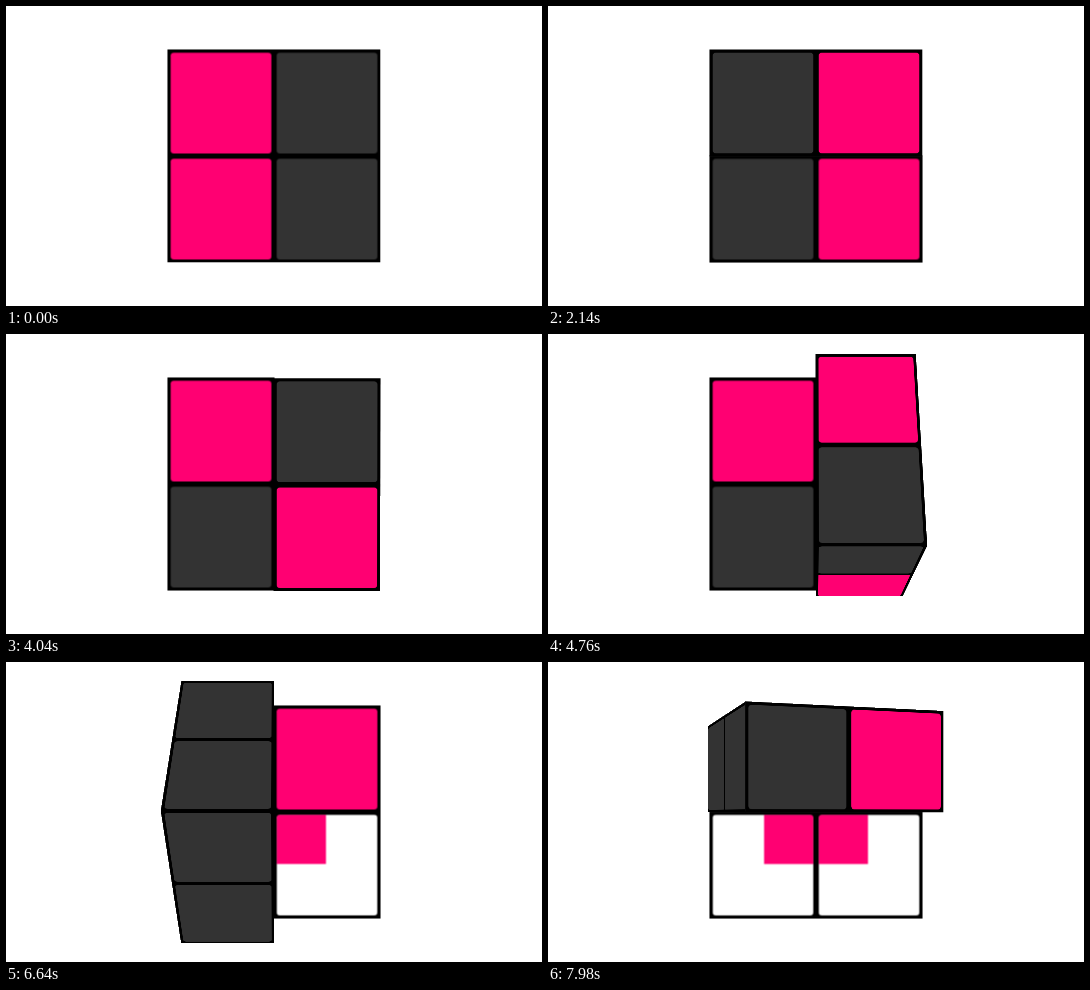
An HTML page for the animation above (8000 ms loop, 536 px wide and 300 px high).

```html
<!DOCTYPE html>
<html lang="en">
<head>
<meta charset="utf-8">
<title>Turning cube</title>
<style>
  html, body { margin: 0; width: 100%; height: 100%; overflow: hidden; background: #fff; }

  #stage {
    position: absolute; left: 0; top: 0; width: 536px; height: 300px; overflow: hidden;
    perspective: 726px; perspective-origin: 268px 150px;
  }
  .scene, .turn { position: absolute; width: 0; height: 0; transform-style: preserve-3d; }
  .scene { left: 268px; top: 150px; transform: scale3d(.4625, .4625, .4625); }

  .face {
    position: absolute; display: flex; flex-wrap: wrap;
    background: #000; box-shadow: 0 0 0 1px #000; backface-visibility: hidden;
  }
  .cell { position: relative; width: 200px; height: 200px; }
  .cell::before { content: ""; position: absolute; inset: 5px; border-radius: 6px; background: var(--fill); }
  .p { --fill: #ff0072; }
  .d { --fill: #333; }
  .x { --mark: left top; }
  .y { --mark: right top; }
  .z { --mark: right bottom; }
  .x, .y, .z { --fill: linear-gradient(#ff0072, #ff0072) var(--mark) / 93px 93px no-repeat #fff; }

  .scene { animation: 8s step-end infinite; }
  .turn { animation: 8s cubic-bezier(.65, 0, .35, 1) infinite; }

  .s1 { animation-name: show1; }
  .s2 { animation-name: show2; }
  .s3 { animation-name: show3; }
  .s4 { animation-name: show4; }
  .s5 { animation-name: show5; }
  .s1 .turn { animation-name: front; }
  .s2 .turn { animation-name: top; }
  .s3 .turn { animation-name: right; }
  .s4 .turn { animation-name: left; }
  .s5 .turn { animation-name: again; animation-timing-function: cubic-bezier(.426, 0, .748, .375); }

  @keyframes show1 { 0% { visibility: visible } 26.75%, 100% { visibility: hidden } }
  @keyframes show2 { 0% { visibility: hidden } 26.75% { visibility: visible } 49.25%, 100% { visibility: hidden } }
  @keyframes show3 { 0% { visibility: hidden } 49.25% { visibility: visible } 71.75%, 100% { visibility: hidden } }
  @keyframes show4 { 0% { visibility: hidden } 71.75% { visibility: visible } 94.25%, 100% { visibility: hidden } }
  @keyframes show5 { 0% { visibility: hidden } 94.25%, 100% { visibility: visible } }

  @keyframes front { 0%, 4.25% { transform: rotateZ(0deg) } 26.75%, 100% { transform: rotateZ(-180deg) } }
  @keyframes top { 0%, 26.75% { transform: rotateY(0deg) } 49.25%, 100% { transform: rotateY(270deg) } }
  @keyframes right { 0%, 49.25% { transform: rotateX(0deg) } 71.75%, 100% { transform: rotateX(-180deg) } }
  @keyframes left { 0%, 71.75% { transform: rotateX(0deg) } 94.25%, 100% { transform: rotateX(270deg) } }
  /* opening part of another 270 degree turn */
  @keyframes again { 0%, 94.25% { transform: rotateY(0deg) } 100% { transform: rotateY(20.19deg) } }
</style>
</head>
<body>
<div id="stage"></div>
<script>
  const SIZE = 200;
  // column, row, width and height of each slice on the 2 x 2 face
  const AREA = {
    all: [0, 0, 2, 2],
    top: [0, 0, 2, 1],
    bottom: [0, 1, 2, 1],
    left: [0, 0, 1, 2],
    right: [1, 0, 1, 2]
  };

  function add(parent, cls) {
    const el = document.createElement('div');
    el.className = cls;
    parent.appendChild(el);
    return el;
  }

  // cells: p pink, d dark, x y z white with a piece of the square in one corner
  function face(parent, area, cells, rotation = '', depth = SIZE) {
    const [col, row, w, h] = AREA[area];
    const x = (col - 1) * SIZE, y = (row - 1) * SIZE;
    const el = add(parent, 'face');
    Object.assign(el.style, {
      left: x + 'px', top: y + 'px',
      width: w * SIZE + 'px', height: h * SIZE + 'px',
      transformOrigin: `${-x}px ${-y}px`,
      transform: `${rotation} translateZ(${depth}px)`
    });
    for (const c of cells) add(el, 'cell ' + c);
  }

  function scene(n, rest, area, sides) {
    const el = add(stage, 'scene s' + n);
    face(el, ...rest);
    const turn = add(el, 'turn');
    for (const [cells, rotation] of sides) face(turn, area, cells, rotation);
  }

  const stage = document.getElementById('stage');

  scene(1, ['all', 'pddp', '', 0], 'all', [['pdpd']]);
  scene(2, ['bottom', 'dp'], 'top', [
    ['dp'], ['zd', 'rotateY(-90deg)'], ['dp', 'rotateY(180deg)'], ['pd', 'rotateY(90deg)']
  ]);
  scene(3, ['left', 'pd'], 'right', [
    ['dp'], ['pd', 'rotateX(90deg)'], ['px', 'rotateX(180deg)']
  ]);
  scene(4, ['right', 'px'], 'left', [
    ['pd'], ['dd', 'rotateX(-90deg)'], ['dd', 'rotateX(180deg)'], ['dy', 'rotateX(90deg)']
  ]);
  scene(5, ['bottom', 'yx'], 'top', [
    ['dp'], ['dd', 'rotateY(-90deg)']
  ]);
</script>
</body>
</html>
```
